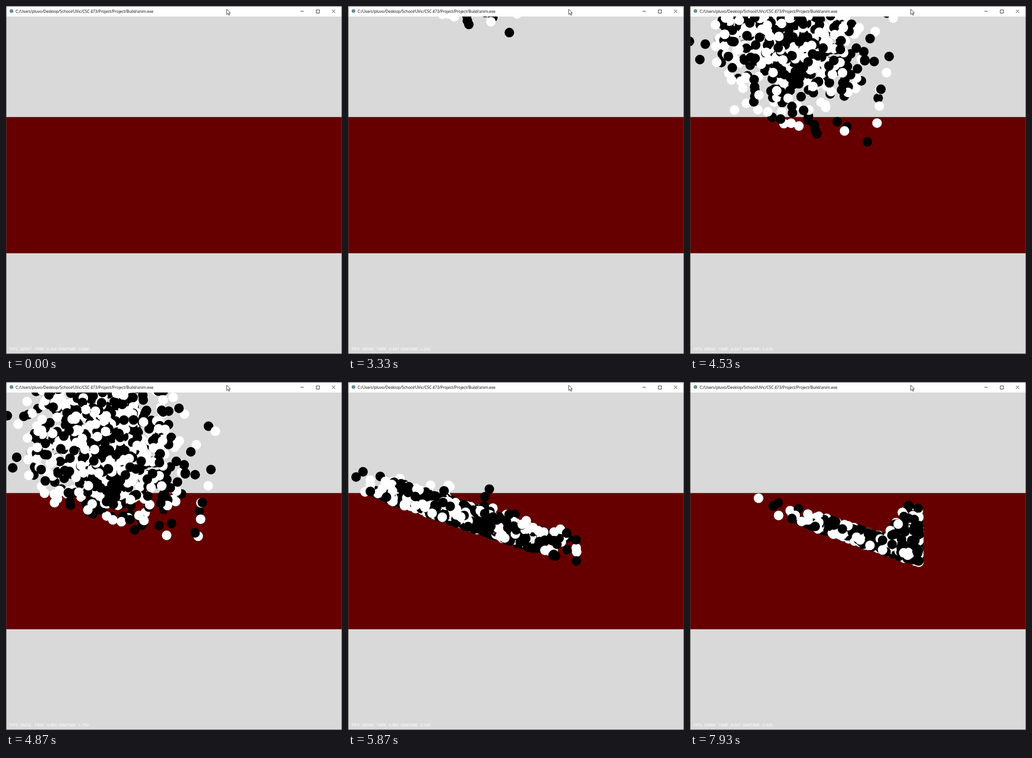
Animation, 737 px wide and 760 px high, one loop 8000 ms. Source, as an HTML page with a canvas:

```html
<!DOCTYPE html>
<html lang="en">
<head>
<meta charset="utf-8">
<title>anim.exe</title>
<style>
  html, body { margin: 0; width: 100%; height: 100%; overflow: hidden; background: #d9d9d9; }
  canvas, svg { position: absolute; left: 0; top: 0; display: block; }
  .title { font: 8.47px "Open Sans", "Noto Sans", sans-serif; fill: #000; }
  .hud { font: 9px "Liberation Sans", Arial, sans-serif; fill: #fff; }
  .line { fill: none; stroke: #222; stroke-width: 1; }
  .frame { stroke: #404040; }
</style>
</head>
<body>
<canvas id="scene" width="737" height="760"></canvas>
<svg width="737" height="760" viewBox="0 0 737 760">
  <rect width="737" height="23" fill="#fff"/>
  <rect class="line frame" x=".5" y=".5" width="736" height="759"/>
  <circle cx="12" cy="11" r="4" fill="#668f92"/>
  <text class="title" x="21" y="15">C:/Users/pluvo/Desktop/School/UVic/CSC 473/Project/Project/Build/anim.exe</text>
  <path class="line" d="M646 11.5h7M680.5 8.5h7v7h-7zM715 8l7 7M722 8l-7 7"/>
  <path d="M484 7v11.5l2.7-2.5 2 4.3 1.8-.8-1.9-4.2h3.6z" fill="#fff" stroke="#111" stroke-width=".9"/>
  <g class="hud">
    <text x="8" y="752">FPS:</text><text id="fps" x="31" y="752"></text>
    <text x="62.5" y="752">TIME</text><text id="time" x="89.5" y="752"></text>
    <text x="115.5" y="752">SIMTIME</text><text id="simtime" x="159" y="752"></text>
  </g>
</svg>
<script>
const LOOP = 8000, FRAMES = 120, COUNT = 740;
const RADIUS = 10.5, CENTER = 210, WALL = 502, HALF_GRAVITY = 200;
const ctx = document.getElementById('scene').getContext('2d');
const label = id => document.getElementById(id);
const fps = label('fps'), time = label('time'), simtime = label('simtime');

let seed = 473;
function random() {
  seed = (seed * 1664525 + 1013904223) >>> 0;
  return seed / 4294967296;
}
// roughly normal, within three standard deviations
const bell = () => (random() + random() + random() - 1.5) * 2;

const floorY = x => 225.5 + x / 3;
const driftX = (spread, t) => Math.min(WALL, CENTER + spread * (t + 0.5) / 2);

function makeBall() {
  const spread = 79 * bell();
  const startY = -474 + 80 * bell() + 0.25 * spread;
  const height = random() * 48 - 4;
  // the falling path meets the ball's own layer above the slope
  const b = spread / 6;
  const c = startY - floorY(CENTER + spread / 4) + height;
  const land = (b + Math.sqrt(b * b - 4 * HALF_GRAVITY * c)) / (2 * HALF_GRAVITY);
  const landX = driftX(spread, land);
  const stop = Math.max(landX, WALL - 65 * random() ** 2);
  const color = random() < 0.5 ? '#000' : '#fff';
  return { spread, startY, height, land, landX, stop, color };
}
const balls = Array.from({ length: COUNT }, makeBall);

function position({ spread, startY, height, land, landX, stop }, t) {
  if (t < land) return [driftX(spread, t), startY + HALF_GRAVITY * t * t];
  const dt = t - land;
  const slideX = landX + (0.4 * spread + 120 * land) * dt + 60 * dt * dt;
  const x = Math.min(slideX, stop);
  // balls pressed against the wall are pushed upwards
  const push = Math.max(0, slideX - stop);
  const lift = 120 * (1 - Math.exp(-push / 200)) * Math.min(1, (stop - 425) / 55);
  const settled = height * (1 - 0.8 * Math.max(0, t - 2.4));
  return [x, floorY(x) - settled - lift];
}

function fpsAt(frame) {
  const noise = Math.abs(Math.sin(frame * 127.1 + 3) * 43758.5453) % 1;
  return Math.floor(28000 + 22000 * noise);
}

function draw(frame) {
  const t = Math.floor(100 * Math.max(0.0401, 0.0328 + 0.0236 * frame)) / 100;
  ctx.fillStyle = '#d9d9d9';
  ctx.fillRect(0, 0, 737, 760);
  ctx.fillStyle = '#660000';
  ctx.fillRect(0, 242.5, 737, 297.5);
  for (const ball of balls) {
    const [x, y] = position(ball, t);
    if (y < 23 - RADIUS) continue;
    ctx.fillStyle = ball.color;
    ctx.beginPath();
    ctx.arc(x, y, RADIUS, 0, 2 * Math.PI);
    ctx.fill();
  }
  fps.textContent = fpsAt(frame);
  time.textContent = (0.114 + frame / 15).toFixed(3);
  simtime.textContent = t.toFixed(3);
}

let shown = -1;
function tick() {
  // frames start on times rounded to 10 ms, hence the small lead
  const frame = Math.floor(((performance.now() + 4) % LOOP) * FRAMES / LOOP);
  if (frame !== shown) draw(shown = frame);
  requestAnimationFrame(tick);
}
tick();
</script>
</body>
</html>
```
